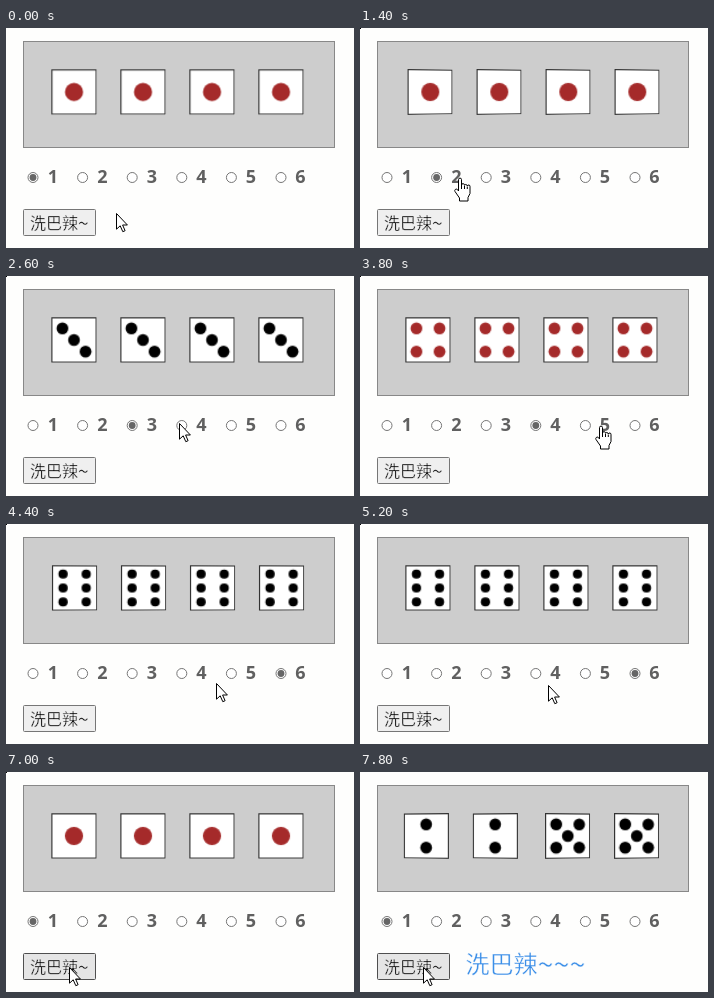
Animation, 348 px wide and 220 px high, one loop 8000 ms. Source, as an HTML page:

```html
<!DOCTYPE html>
<html lang="zh">
<head>
<meta charset="utf-8">
<title>Dice</title>
<style>
  html, body { margin: 0; width: 100%; height: 100%; overflow: hidden; background: #fefefd; }
  #stage { position: relative; width: 348px; height: 220px; overflow: hidden; }
  #stage > svg { position: absolute; left: 0; top: 0; }
  .die { position: absolute; top: 44px; width: 40px; height: 40px; perspective: 170px; }
  .cube { width: 40px; height: 40px; transform-style: preserve-3d; }
  .face {
    position: absolute; left: 0; top: 0; width: 40px; height: 40px; box-sizing: border-box;
    background: #fff; border: 1px solid #333; backface-visibility: hidden;
  }
  .face svg { position: absolute; left: -1px; top: -1px; }
  .digit { font: bold 18px "Open Sans", "Noto Sans", sans-serif; fill: #606060; text-anchor: middle; }
  /* a thin stroke in the background colour makes the glyphs lighter */
  .cjk { font-family: "Noto Sans CJK SC", "Noto Sans CJK", sans-serif; font-weight: 300; stroke-width: .35; }
  .tilde { font-size: 1.2em; }
</style>
</head>
<body>
<div id="stage">
  <svg id="page" width="348" height="220">
    <rect id="corner" width="1" height="1" fill="#000"/>
    <rect x="17.5" y="13.5" width="311" height="106" fill="#cdcdcd" stroke="#888"/>
    <g id="radios"></g>
    <rect id="button" x="17.5" y="181.5" width="72" height="26" rx="1"/>
    <text class="cjk" x="24" y="200.5" font-size="16" stroke="#efefef">洗巴辣<tspan class="tilde" dy="1">~</tspan></text>
    <text id="shout" class="cjk" x="105.5" y="201" font-size="24" fill="#3c8fe8" stroke="#fefefd">洗巴辣<tspan class="tilde" dy="2">~~~</tspan></text>
  </svg>
  <div id="dice"></div>
  <svg width="348" height="220">
    <g id="cursor" fill="#fff" stroke="#000" stroke-linejoin="round">
      <path id="arrow" d="M.5 .5V16.2L4.2 12.8L6.8 18.7L9.1 17.7L6.6 12H11.4Z"/>
      <g id="hand">
        <path d="M-1.5 13V1.6a1.5 1.5 0 0 1 3 0V7a1.5 1.5 0 0 1 3 .3a1.5 1.5 0 0 1 2.8 .7a1.4 1.4 0 0 1 2.7 .8V15.5L8 19.5V23H-.5V20L-5 13.5a1.6 1.6 0 0 1 2.2-2.2Z"/>
        <path d="M1.5 7V11M4.5 8V11M7.3 8.5V11" fill="none"/>
      </g>
    </g>
  </svg>
</div>
<script>
const LOOP = 8000, STEP = 200, TURN = 250, TRAVEL = 380, LAG = 60;
const $ = id => document.getElementById(id);
const NS = 'http://www.w3.org/2000/svg';

function add(parent, name, attrs, text) {
  const el = document.createElementNS(NS, name);
  for (const k in attrs) el.setAttribute(k, attrs[k]);
  if (text) el.textContent = text;
  return parent.appendChild(el);
}

// The [x, y] turn of the cube that brings each value to the front
const POSE = [[0, 0], [0, 90], [-90, 0], [90, 0], [0, -90], [0, -180]];

const corners = [[-1, -1], [1, -1], [-1, 1], [1, 1]];
const PIPS = [
  [[0, 0]],
  [[0, -1], [0, 1]],
  [[-1, -1], [0, 0], [1, 1]],
  corners,
  [...corners, [0, 0]],
  [-1.2, 0, 1.2].flatMap(y => [[-1, y], [1, y]])
];
const pipRadius = value => value === 1 ? 8 : value === 6 ? 4.1 : 5.2;

function makeFace(pips, i) {
  const face = document.createElement('div');
  const [x, y] = POSE[i], value = i + 1;
  face.className = 'face';
  face.style.transform = `rotateX(${-x}deg) rotateY(${-y}deg) translateZ(20px)`;
  const svg = add(face, 'svg', { width: 40, height: 40 });
  const fill = value === 1 || value === 4 ? '#a52a2a' : '#000';
  for (const [px, py] of pips)
    add(svg, 'circle', { cx: 20 + px * 10.2, cy: 20 + py * 10.2, r: pipRadius(value), fill });
  return face;
}

function makeDie(i) {
  const die = document.createElement('div');
  const cube = document.createElement('div');
  die.className = 'die';
  die.style.left = 48 + 69 * i + 'px';
  cube.className = 'cube';
  cube.append(...PIPS.map(makeFace));
  die.append(cube);
  $('dice').append(die);
  return cube;
}
const cubes = [0, 1, 2, 3].map(makeDie);

const labelX = i => 46.8 + 49.5 * i;
const marks = PIPS.map((_, i) => {
  const cx = 27 + 49.6 * i, cy = 149.5, g = $('radios');
  add(g, 'circle', { cx, cy, r: 5, fill: '#fff', stroke: '#767676' });
  const mark = add(g, 'circle', { cx, cy, r: 3.4, fill: '#666' });
  add(g, 'text', { class: 'digit', x: labelX(i), y: 155 }, String(i + 1));
  return mark;
});

// Cursor stops: it waits at x, y until "at", clicks there if there is a pick, then moves on
const STOPS = [
  { at: 700, x: 110, y: 185 },
  { at: 1320, x: 95, y: 150, pick: 2 },
  { at: 2145, x: 137, y: 150, pick: 3 },
  { at: 3090, x: 173, y: 147, pick: 4 },
  { at: 3900, x: 241, y: 150, pick: 5 },
  { at: 4135, x: 290, y: 150, pick: 6 },
  { at: 5200, x: 188, y: 161 },
  { at: 6125, x: 44, y: 148, pick: 1 },
  { at: 6620, x: 44, y: 148 },
  { at: LOOP, x: 63, y: 195 }
];
const PICKS = [{ at: -LOOP, pick: 1 }, ...STOPS.filter(s => s.pick)];
const SHUFFLE = 7560;
const ROLLS = [
  ...PICKS.map(p => ({ at: p.at + LAG, values: Array(4).fill(p.pick) })),
  { at: SHUFFLE + LAG, values: [2, 2, 5, 5] }
];

const mix = (a, b, k) => a + (b - a) * k;
const smooth = k => k * k * (3 - 2 * k);
const clamp = k => Math.min(1, Math.max(0, k));
const lastBefore = (list, t) => list.filter(e => e.at <= t).length - 1;

// cubic-bezier(.25, .1, .25, 1)
function ease(x) {
  const bez = (p, q, s) => 3 * p * s * (1 - s) ** 2 + 3 * q * s * s * (1 - s) + s ** 3;
  let lo = 0, hi = 1;
  for (let i = 0; i < 24; i++) {
    const mid = (lo + hi) / 2;
    if (bez(.25, .25, mid) < x) lo = mid; else hi = mid;
  }
  return bez(.1, 1, lo);
}

function cursorAt(t) {
  const i = lastBefore(STOPS, t);
  if (i < 0) return STOPS[0];
  const from = STOPS[i], to = STOPS[i + 1];
  const k = smooth(clamp((t - from.at) / Math.min(TRAVEL, to.at - from.at)));
  return { x: mix(from.x, to.x, k), y: mix(from.y, to.y, k) };
}

const show = (el, on) => el.setAttribute('visibility', on ? 'visible' : 'hidden');

function drawDice(t) {
  const n = lastBefore(ROLLS, t);
  const { at, values } = ROLLS[n];
  const before = ROLLS[Math.max(0, n - 1)].values;
  const k = ease(clamp((t - at) / TURN));
  cubes.forEach((cube, i) => {
    const [x0, y0] = POSE[before[i] - 1], [x1, y1] = POSE[values[i] - 1];
    cube.style.transform = `rotateY(${mix(y0, y1, k)}deg) rotateX(${mix(x0, x1, k)}deg)`;
  });
}

function drawCursor({ x, y }) {
  const pointing = y < 160 && marks.some((_, i) => Math.abs(x - labelX(i)) < 10);
  $('cursor').setAttribute('transform', `translate(${Math.round(x)} ${Math.round(y)})`);
  show($('hand'), pointing);
  show($('arrow'), !pointing);

  const hover = x > 17 && x < 90 && y > 181 && y < 208;
  $('button').setAttribute('fill', hover ? '#e5e5e5' : '#efefef');
  $('button').setAttribute('stroke', hover ? '#4f4f4f' : '#767676');
}

function draw(t) {
  drawDice(t);
  drawCursor(cursorAt(t));
  const { pick } = PICKS[lastBefore(PICKS, t)];
  marks.forEach((mark, i) => show(mark, i === pick - 1));
  show($('shout'), t >= SHUFFLE);
  show($('corner'), t >= STEP && t < SHUFFLE);
}

const origin = performance.now();
function tick() {
  const t = (performance.now() - origin) % LOOP;
  draw(Math.floor(t / STEP) * STEP);
  requestAnimationFrame(tick);
}
tick();
</script>
</body>
</html>
```
